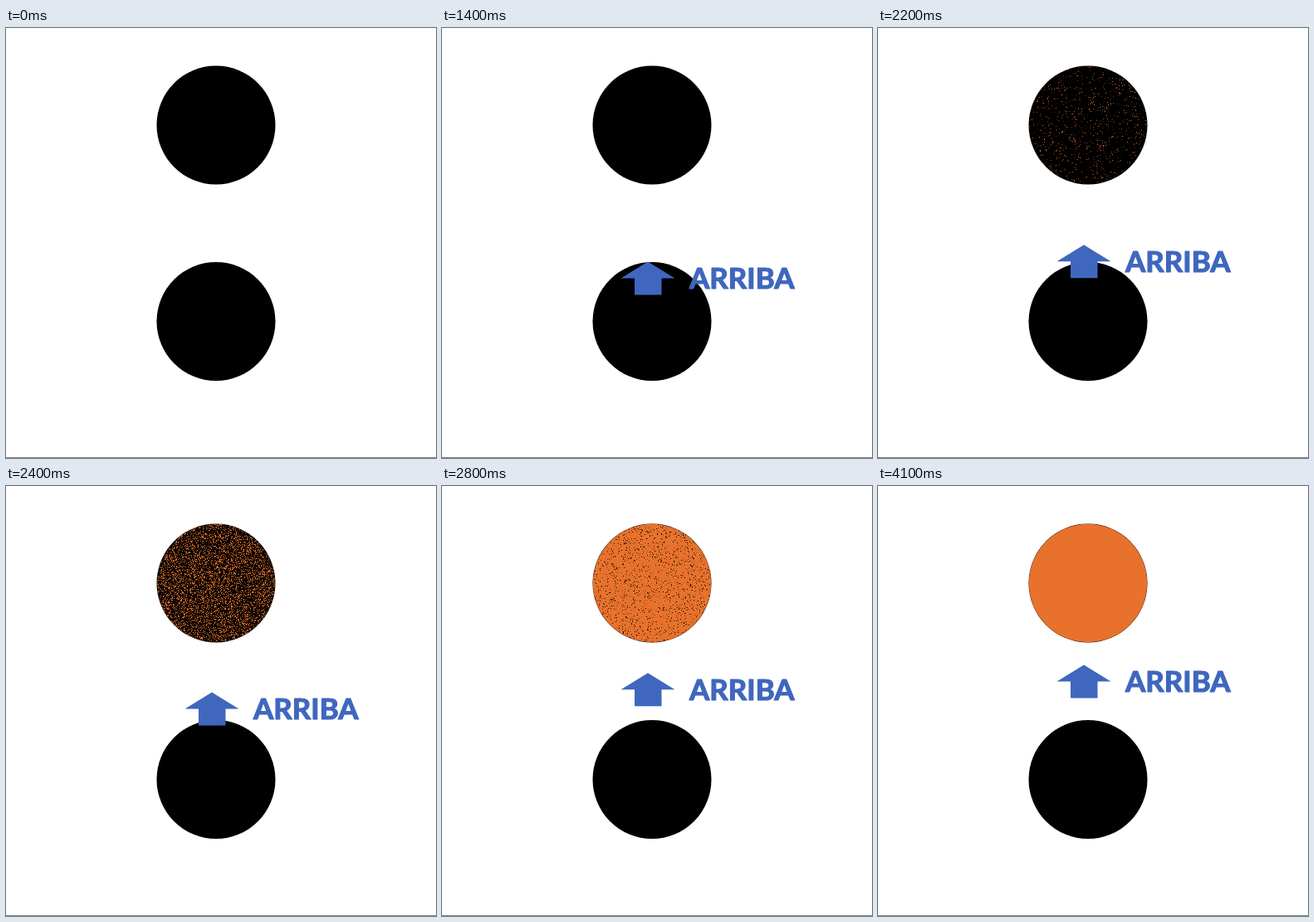
These frames come from a looping animation (518 by 518 pixels, 4.4 s). An HTML page with a canvas:

```html
<!DOCTYPE html>
<html lang="es">
<head>
<meta charset="utf-8">
<style>
html, body { margin: 0; width: 100%; height: 100%; overflow: hidden; background: #fff; }
canvas { display: block; }
</style>
</head>
<body>
<canvas id="stage" width="518" height="518"></canvas>
<script>
const ctx = document.getElementById('stage').getContext('2d');
const LOOP = 4400, STEP = 100;
const ORANGE = '#e8722c', BLUE = '#3f67be';
const X = 253, TOP = 117, BOTTOM = 353.5, R = 71.5, INNER = R - 0.3;

// Small seeded generator, so the dissolve is the same in every loop
let seed = 7;
function random() {
  seed = (Math.imul(seed, 1664525) + 1013904223) >>> 0;
  return seed / 4294967296;
}

// Each pixel of the upper disc turns orange around its own moment
const SIZE = 144, FADE = 160;
const flipTimes = Float32Array.from({ length: SIZE * SIZE },
  () => 2015 + 340 * (random() + random() + random()));
const layer = document.createElement('canvas');
layer.width = layer.height = SIZE;
const layerCtx = layer.getContext('2d');
const grain = layerCtx.createImageData(SIZE, SIZE);

function disc(y, r, color) {
  ctx.fillStyle = color;
  ctx.beginPath();
  ctx.arc(X, y, r, 0, 2 * Math.PI);
  ctx.fill();
}

function dissolve(t) {
  flipTimes.forEach((flip, i) =>
    grain.data.set([232, 114, 44, 255 * ((t - flip) / FADE + 0.5)], i * 4));
  layerCtx.putImageData(grain, 0, 0);
  ctx.save();
  ctx.beginPath();
  ctx.arc(X, TOP, INNER, 0, 2 * Math.PI);
  ctx.clip();
  ctx.drawImage(layer, X - SIZE / 2, TOP - SIZE / 2);
  ctx.restore();
}

function label(y) {
  ctx.fillStyle = ctx.strokeStyle = BLUE;
  ctx.beginPath();
  for (const [x, dy] of [[248, 0], [280.5, 20], [264.5, 20], [264.5, 40],
                         [232, 40], [232, 20], [215.5, 20]]) ctx.lineTo(x, y + dy);
  ctx.fill();
  ctx.font = 'bold 35px Lato, sans-serif';
  ctx.lineWidth = 1.2;
  ctx.lineJoin = 'round';
  ctx.fillText('ARRIBA', 298, y + 32.5);
  ctx.strokeText('ARRIBA', 298, y + 32.5);
}

function draw(t) {
  ctx.fillStyle = '#fff';
  ctx.fillRect(0, 0, 518, 518);
  ctx.fillStyle = '#808080';
  ctx.fillRect(0, 517, 518, 1);
  disc(TOP, R, '#000');
  disc(BOTTOM, R, '#000');
  if (t > 3200) disc(TOP, INNER, ORANGE);
  else if (t > 1900) dissolve(t);
  if (t >= 1400) {
    const p = Math.min(1, Math.max(0, (t - 1600) / 1600));
    label(281.5 - 33 * (1 - Math.cos(Math.PI * p)));
  }
}

const start = performance.now();
function tick() {
  const t = (performance.now() - start) % LOOP;
  draw(Math.floor(t / STEP) * STEP);
  requestAnimationFrame(tick);
}
tick();
</script>
</body>
</html>
```
